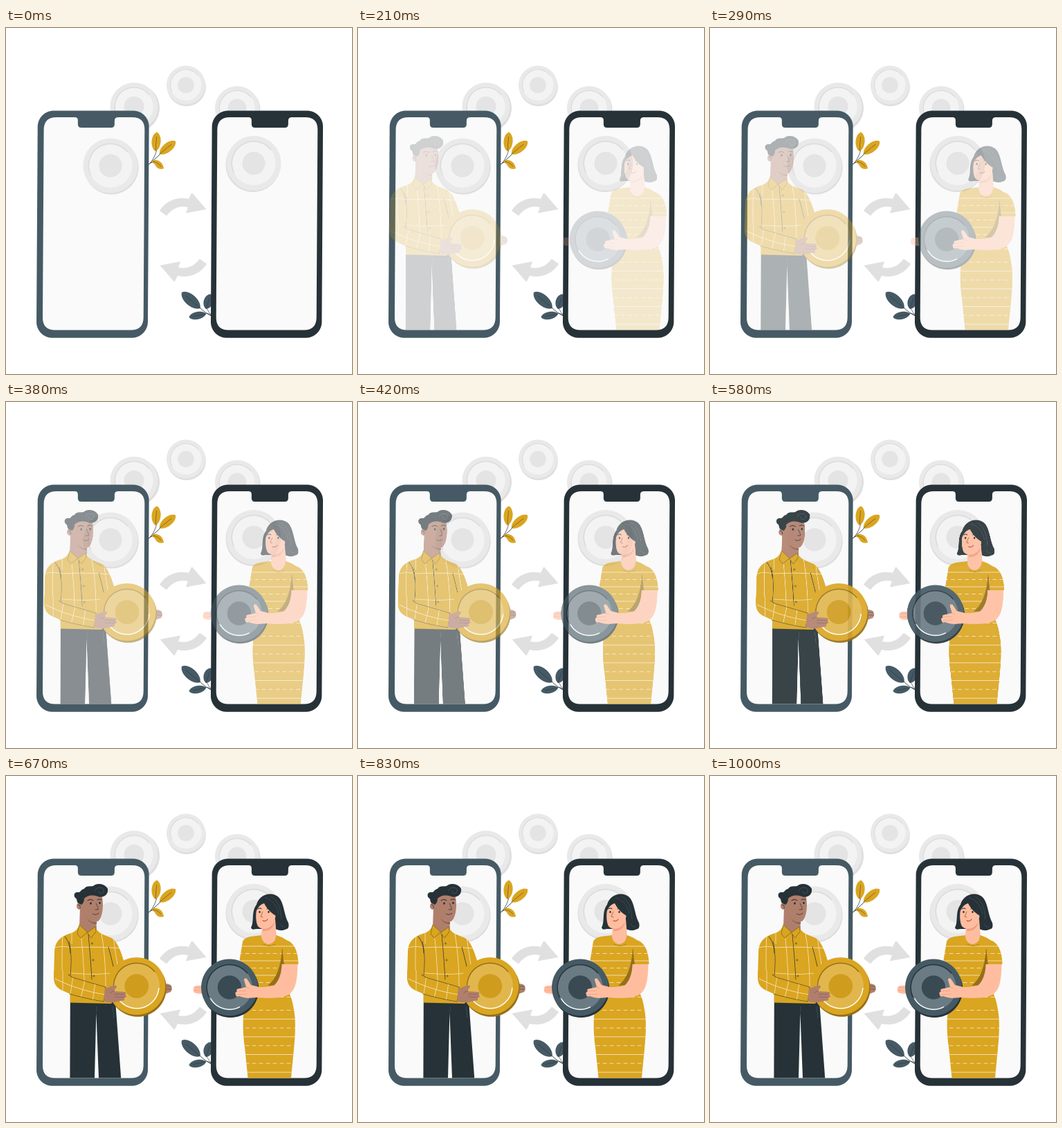
An HTML page with a canvas that plays this animation: 500x500 px, repeating every 1.04 s.

```html
<!DOCTYPE html>
<html lang="en">
<head>
<meta charset="utf-8">
<title>Coin exchange</title>
<style>
html, body { margin: 0; width: 100%; height: 100%; overflow: hidden; background: #fff; }
canvas { display: block; width: 100vw; height: 100vh; }
</style>
</head>
<body>
<canvas id="stage" width="500" height="500"></canvas>
<script>
const ctx = document.getElementById('stage').getContext('2d');
const GOLD = '#daa520', BROWN = '#94701a', NAVY = '#263238', SLATE = '#455a64';
const SKIN_M = '#b07f6c', SKIN_W = '#ffbda0';

// Each layer is painted once at double size.
function layer(paint) {
  const c = document.createElement('canvas');
  c.width = c.height = 1000;
  const g = c.getContext('2d');
  g.scale(2, 2);
  g.lineCap = g.lineJoin = 'round';
  paint(g);
  return c;
}

function fill(g, d, color) {
  g.fillStyle = color;
  g.fill(new Path2D(d));
}

function line(g, d, color = NAVY, width = 0.7, dash = []) {
  g.strokeStyle = color;
  g.lineWidth = width;
  g.setLineDash(dash);
  g.stroke(new Path2D(d));
  g.setLineDash([]);
}

function dot(g, x, y, r, color, ry = r) {
  g.fillStyle = color;
  g.beginPath();
  g.ellipse(x, y, r, ry, 0, 0, 7);
  g.fill();
}

function arc(g, x, y, r, from, to, color, width) {
  g.strokeStyle = color;
  g.lineWidth = width;
  g.beginPath();
  g.arc(x, y, r, from, to);
  g.stroke();
}

function clipped(g, d, paint) {
  g.save();
  g.clip(new Path2D(d));
  paint();
  g.restore();
}

function coin(g, x, y, r, dx, dy, c) {
  dot(g, x + dx, y + dy, r, c.edge);
  dot(g, x, y, r, c.rim);
  const inner = r * 0.8;
  dot(g, x, y, inner, c.face);
  arc(g, x, y, inner, 2.7, 5.6, c.shade, r * 0.035);
  if (c.glow) arc(g, x, y, inner - 1, c.glow[0], c.glow[1], '#fff', 1.4);
  dot(g, x, y, r * 0.42, c.mark);
}

const GREY = { edge: '#dedede', rim: '#e9e9e9', face: '#f3f3f3', shade: '#dadada', mark: '#e4e4e4' };
const YELLOW = { edge: BROWN, rim: GOLD, face: '#e1b74d', shade: BROWN, mark: '#cf9c1e', glow: [0.1, 2.55] };
const STEEL = { edge: NAVY, rim: SLATE, face: '#6a7b83', shade: NAVY, mark: '#3a4a53', glow: [1.1, 2.6] };

function leaf(g, x1, y1, x2, y2, w, color) {
  const len = Math.hypot(x2 - x1, y2 - y1);
  g.save();
  g.translate(x1, y1);
  g.rotate(Math.atan2(y2 - y1, x2 - x1));
  fill(g, `M0,0 C${len * 0.15},${-w * 0.7} ${len * 0.85},${-w * 0.75} ${len},0 C${len * 0.85},${w * 0.75} ${len * 0.15},${w * 0.7} 0,0Z`, color);
  line(g, `M0,0 L${len * 0.75},0`, NAVY, 0.45);
  g.restore();
}

// Inner screen box: x, w; frame thickness on both sides: l, r.
function phone(g, x, w, l, r, notch, color) {
  const screen = `M${x + 18},129 H${notch - 3} Q${notch + 1},129 ${notch + 1},134 V139 Q${notch + 1},144 ${notch + 6},144
    H${notch + 49} Q${notch + 54},144 ${notch + 54},139 V134 Q${notch + 54},129 ${notch + 59},129
    H${x + w - 18} Q${x + w},129 ${x + w},147 V418 Q${x + w},436.5 ${x + w - 18},436.5 H${x + 18} Q${x},436.5 ${x},418 V147 Q${x},129 ${x + 18},129Z`;
  g.save();
  g.transform(1, 0, -0.006, 1, 1.7, 0);
  g.fillStyle = color;
  g.beginPath();
  g.roundRect(x - l, 119.5, w + l + r, 328.2, 23);
  g.fill();
  fill(g, screen, '#fafafa');
  g.restore();
}

const scene = layer(g => {
  g.fillStyle = '#fff';
  g.fillRect(0, 0, 500, 500);
  coin(g, 185, 113.5, 34.5, 2.5, 2, GREY);
  coin(g, 260, 82.5, 28, 0.8, 2.5, GREY);
  coin(g, 334, 116, 32, 1.5, 2, GREY);

  line(g, 'M204,199 Q213,193 218,176 M206,197 Q214,191 224,181 M206,197 Q211,193 216,194', NAVY, 0.6);
  leaf(g, 216, 178, 218, 150.5, 12, GOLD);
  leaf(g, 222, 182, 245, 163.5, 12, GOLD);
  fill(g, 'M210,193 C214,189 226,190 228,203 C222,205 218,203 215,197Z', GOLD);
  line(g, 'M212,193 Q220,194 224,200', NAVY, 0.45);

  line(g, 'M298,417 Q288,412 279,403 M297,415 Q291,409 290,403 M296,415 Q291,411 286,413', NAVY, 0.6);
  leaf(g, 280.5, 405, 254, 382, 14.5, SLATE);
  leaf(g, 289, 406, 296, 384.5, 12.5, SLATE);
  leaf(g, 289, 413, 264.5, 418, 10, SLATE);

  const arrow = 'M222,264 C231,250 247,243 264,247 L268,239 Q269,238 270,239.5 L289.5,262 L260,267.5 L263,259 C250,256 240,261 232,271.5Z';
  fill(g, arrow, '#e0e0e0');
  g.save();
  g.translate(512, 605);
  g.rotate(Math.PI);
  fill(g, arrow, '#e0e0e0');
  g.restore();

  phone(g, 53.8, 145.7, 8.9, 6.3, 102, SLATE);
  coin(g, 151, 199, 39.5, 1.2, 2, GREY);
  phone(g, 304.5, 145, 7.7, 7.7, 353, NAVY);
  coin(g, 358, 195.5, 39.5, -1, 2, GREY);
});

function manHead(g) {
  fill(g, 'M107,190 L106,219 Q118,234 131,221 L130,206Z', SKIN_M);
  fill(g, 'M109,176 C115,170 134,170 139,175 C141,187 140,202 134,209 C129,213 121,211 116,206 L109,196Z', SKIN_M);
  fill(g, 'M117,206 Q124,213 131,211 L131,214 Q122,214 117,206Z', '#8c6252');
  dot(g, 106, 188, 4, SKIN_M, 5);
  fill(g, 'M105,184 C101,182 104,178 100,176 C97,172 99,167 105,168 C108,168 108,164 113,163 C116,158 122,160 126,159 C131,154 143,155 147,163 C148,171 142,176 134,174.5 C127,172 120,171 113,177 Q113,183 109,186Z', NAVY);
  line(g, 'M129,166 C130,159 143,160 141,167 C139,171 133,170 134,166', '#607078', 0.5);
  line(g, 'M118,180 Q122,177 126,180 M132,179 Q135,177 138,179', NAVY, 1);
  dot(g, 122.5, 184, 1.3, NAVY, 1.6);
  dot(g, 135.5, 183.5, 1.3, NAVY, 1.6);
  line(g, 'M130,184 Q134,191 133,193 L129,193 M125,199 Q130,202 134,198 M104,186 Q108,186 107,191', NAVY, 0.7);
}

const man = layer(g => {
  fill(g, 'M92.8,324 L92.4,436.4 H128 L130.4,342 L134,436.4 H166.2 L158,324Z', NAVY);
  line(g, 'M131,333 V341 M154,333 L156,350', '#526068', 0.5);

  const shirt = 'M105,217 C101,227 92,227 86,230 C75,235 70,243 70,256 L69,290 C69,302 74,307 84,311 L92.5,315 V327.5 L152,329 L171,300 V270 C165,249 159,236 150,233 C143,230 134,228 130,220Z';
  fill(g, shirt, GOLD);
  clipped(g, shirt, () => {
    line(g, 'M82,230 Q80,260 82,310 M95,226 V242 M108,226 Q112,260 113,296 M138,228 Q144,262 144,304 M155,232 Q158,255 161,272 M70,248 Q82,245 94,248 Q130,246 165,249 M69,284 Q82,281 96,285 L112,286 Q134,287 150,285', '#f5e6bd', 0.8);
  });
  manHead(g);
  const collar = 'M106,215 L103,228 L108,234 L117,226 L123,234 L130,225 L129,218 L118,226Z';
  fill(g, collar, GOLD);
  line(g, collar, BROWN, 0.8);
  line(g, 'M119,229 Q122,260 124,294 M148,247 Q152,262 155,275', NAVY, 0.7);
  for (const [x, y] of [[124.5, 242], [126, 266], [127, 289]]) dot(g, x, y, 1.5, BROWN);

  fill(g, 'M229,300 Q238,300 239,304 Q241,308 238,312 L230,315Z', SKIN_M);
  line(g, 'M232,304 H239 M232,308 H239', NAVY, 0.5);
  coin(g, 188.8, 303.6, 41.5, 1.5, 2.8, YELLOW);

  const sleeve = 'M69,282 V290 C69,302 74,307 84,311 Q112,321 141,326.5 L144,304.5 L96,291 L92,280Z';
  fill(g, sleeve, GOLD);
  clipped(g, sleeve, () => {
    line(g, 'M82,280 V311 M97,289 L93,315 M114,295 L108,321 M129,298 L125,326 M71,293 Q105,310 144,316', '#f5e6bd', 0.8);
  });
  line(g, 'M91,239 Q96,258 93,288 M85,232 Q92,240 93,256 M90,287 L96,291 L144,305 L141,326 M92,315 Q116,322 141,326', NAVY, 0.6);
  fill(g, 'M143,307 C149,306 152,303 157,303 Q160,302 160,305 L155,311 L172,312 Q175,314 172,315.5 L174,318 Q174,320 171,320 L171,324 L157,327 Q148,328 141,325Z', SKIN_M);
  line(g, 'M157,315 L172,315.5 M157,319 L172,319.5 M155,311 L151,313', '#7a5546', 0.6);
});

function womanHead(g) {
  fill(g, 'M362,186 C365,173 380,166.5 391,173 C402,179 401,200 408,212 Q410,221 404,221.5 Q398,225 389,221 L361,221 Q355,223 354,219 C359,210 354,196 362,186Z', NAVY);
  fill(g, 'M370,212 L369,233 C369,246 390,246 391,232 L389,207Z', SKIN_W);
  fill(g, 'M371,219 Q382,220 388,211 Q385,225 371,224Z', '#f29f83');
  fill(g, 'M363,188 C360,200 361,212 364,217 C368,222 377,222 383,217 C390,211 391,198 388,187 L372,180Z', SKIN_W);
  fill(g, 'M361,197 C361,180 368,174 379,173 L394,185 L390,202 C383,198 377,192 373,184 Q365,186 361,197Z', NAVY);
  line(g, 'M374,176 Q389,179 394,199 M383,174 Q397,182 398,207 M396,214 Q399,219 403,218', '#526068', 0.5);
  line(g, 'M364,192 Q367,190 369,192 M377,192 Q380,190 384,193', NAVY, 1);
  dot(g, 366.5, 196.5, 1.2, NAVY, 1.5);
  dot(g, 379.5, 196.5, 1.2, NAVY, 1.5);
  line(g, 'M371,196 L368,203 L371,204', '#a14e3c', 0.7);
  line(g, 'M371,209 Q375,211 378,207', '#b23c34', 1);
}

// Alternating solid and dashed rows between two heights.
function stripes(g, top, bottom, gap, dashed) {
  for (let y = top; y < bottom; y += gap, dashed = !dashed) {
    line(g, `M336,${y} H424`, '#f0dcae', 1, dashed ? [5, 5] : []);
  }
}

const woman = layer(g => {
  const dress = 'M369,230 C357,232 346,231 342,239 L336,275 C337,300 344,310 348.5,319 C342,335 341,365 345,392 L349.5,436.4 H412 C415,400 421,363 416,338 Q414,325 411,318 C404,302 399,287 399,272 L422.5,272 C422,254 417,241 405,237 Q398,232 390,230 C390,247 369,247 369,230Z';
  womanHead(g);
  fill(g, dress, GOLD);
  clipped(g, dress, () => {
    stripes(g, 246, 320, 10.5, false);
    stripes(g, 338.5, 436, 12.8, true);
  });
  fill(g, 'M399,250 C397,274 392,292 378,303 L398,302 L402,274Z', BROWN);
  line(g, 'M399,250 Q401,261 399,272 M372,243 Q380,248 389,243', BROWN, 0.7);

  fill(g, 'M283,303 Q272,302 271,306 Q270,310 272,313 Q279,316 284,314Z', SKIN_W);
  line(g, 'M273,306 H281 M272,310 H281', '#e58c70', 0.5);
  coin(g, 323, 305.5, 41, 1.3, 2.6, STEEL);

  fill(g, 'M421.5,272 C421,289 420,305 412,313 C405,321 385,322 362,320 L350,321 Q341,320 337,318 Q332,320 332,316 Q330,313 334,311 Q331,308 338,307 L347,305 L344,295 Q344,291 348,293 L354,302 L366,305 Q382,305 388,302 Q398,292 398.5,272Z', SKIN_W);
  line(g, 'M335,311 L347,310 M334,316 L348,315 M347,305 L351,307', '#e58c70', 0.6);
});

// Ease with a soft overshoot: cubic-bezier(.36, -.01, .5, 1.38)
const bez = (s, a, b) => 3 * s * (1 - s) * ((1 - s) * a + s * b) + s * s * s;

function ease(x) {
  let lo = 0, hi = 1;
  for (let i = 0; i < 24; i++) {
    const mid = (lo + hi) / 2;
    if (bez(mid, 0.36, 0.5) < x) lo = mid; else hi = mid;
  }
  return bez(hi, -0.01, 1.38);
}

const LOOP = 1040, SLIDE = 30;

function draw(time) {
  const step = Math.floor((time % LOOP + 5) * 24 / 1000);
  const p = step < 2 ? 0 : ease(Math.min(1, (step + 1) / 25));
  const shift = SLIDE * (1 - p);
  ctx.globalAlpha = 1;
  ctx.drawImage(scene, 0, 0, 500, 500);
  ctx.globalAlpha = Math.max(0, Math.min(1, p));
  ctx.drawImage(man, -shift, 0, 500, 500);
  ctx.drawImage(woman, shift, 0, 500, 500);
}

const start = performance.now();
function tick() {
  draw(performance.now() - start);
  requestAnimationFrame(tick);
}
tick();
</script>
</body>
</html>
```
